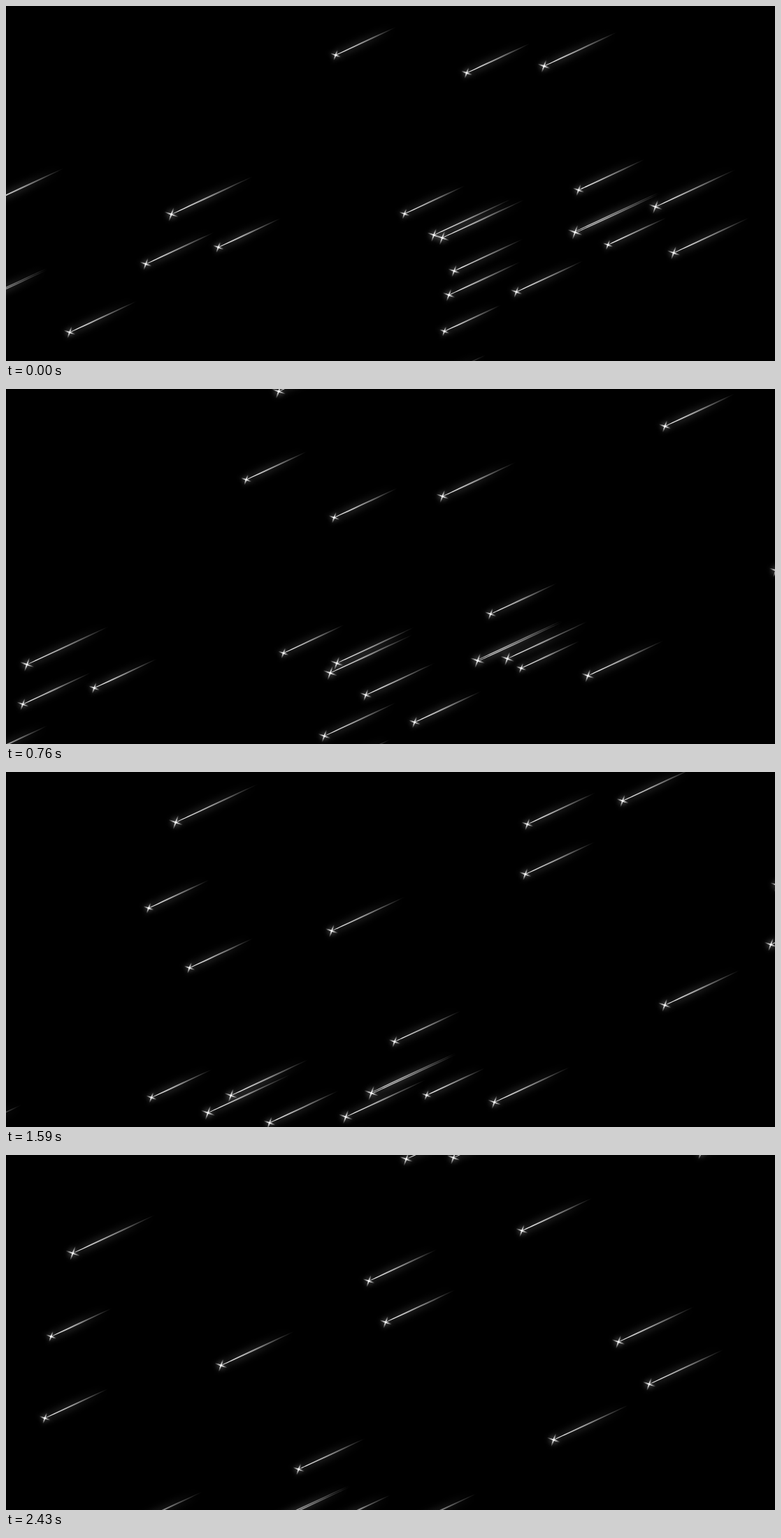
These frames come from a looping animation (1100x509 px, 2500 ms). An HTML page with a canvas:

```html
<!DOCTYPE html>
<html lang="en">
<head>
<meta charset="utf-8">
<title>Falling stars</title>
<style>
html, body { margin: 0; width: 100%; height: 100%; overflow: hidden; background: #000; }
canvas { display: block; }
</style>
</head>
<body>
<canvas id="sky" width="1100" height="509"></canvas>
<script>
const ctx = document.getElementById("sky").getContext("2d");
const W = 1100, H = 509, LOOP = 2500, STEPS = 36;
const TILT = 25 * Math.PI / 180;
const SLOPE = Math.tan(TILT);

// head x, head y at the start; leftward pixels per step; horizontal reach of the tail
const stars = [
  [471.5, 70.5, 11.63, 87], [659, 96, 17.24, 91], [769.5, 86.3, 13.2, 105],
  [819, 264, 11.44, 95], [929, 288, 19.26, 115], [814, 324.5, 12.67, 122],
  [-62, 433.5, 13, 122], [-22, 281.5, 13, 105], [236.5, 298.8, 18.77, 117],
  [200, 370, 16, 98], [303.7, 346, 16.14, 90], [91, 468, 11.64, 97],
  [570, 298, 15.74, 87], [612, 328.5, 12.62, 111], [624, 332.5, 14.57, 118],
  [641, 380, 11.48, 99], [633.5, 414.5, 16.2, 103], [627, 466.5, 14.35, 81],
  [730, 410, 13.23, 96], [861, 342.5, 11.28, 84], [955, 354, 11.15, 109],
  [592, 544.5, 13, 95], [1125.5, -31.8, 16.64, 100], [525, -59.4, 12.27, 118],
  [1247, 192.3, 13.25, 108], [1180.5, -127.7, 18.9, 98], [1158, -87.2, 12, 101],
  [1537.5, -40.4, 18.9, 109], [1427.5, 92, 14.5, 107],
  [1027.5, -206.2, 13, 110], [1095, -208.2, 13, 110], [1449, -215.2, 13, 105]
];

// Thin ellipse from x0 to x1, filled along its length
function lens(x0, x1, y, height, stops) {
  const fill = ctx.createLinearGradient(x0, 0, x1, 0);
  stops.forEach((a, i) => fill.addColorStop(i / (stops.length - 1), `rgba(255,255,255,${a})`));
  ctx.fillStyle = fill;
  ctx.beginPath();
  ctx.ellipse((x0 + x1) / 2, y, (x1 - x0) / 2, height / 2, 0, 0, Math.PI * 2);
  ctx.fill();
}

function drawStar(x, y, reach) {
  const len = reach / Math.cos(TILT);
  const arm = len / 12;
  ctx.save();
  ctx.translate(x, y);
  ctx.rotate(-TILT);
  if (reach > 120) {
    lens(0, len, -1, 1.5, [1, 0]);
    lens(0, len, 1, 1.5, [1, 0]);
  } else {
    lens(0, len, 0, 2, [1, 0]);
  }
  for (const turn of [Math.PI / 4, -Math.PI / 4]) {
    ctx.save();
    ctx.rotate(turn);
    lens(-arm, arm, 0, 2, [0, 1, 0]);
    ctx.restore();
  }
  ctx.restore();
}

// Steps last 70 ms, apart from two of 60 ms
const startOf = n => 70 * n - (n >= 4 ? 10 : 0) - (n >= 20 ? 10 : 0);

function stepAt(ms) {
  let n = STEPS - 1;
  while (n > 0 && startOf(n) > ms) n--;
  return n;
}

function draw(n) {
  ctx.shadowBlur = 0;
  ctx.fillStyle = "#000";
  ctx.fillRect(0, 0, W, H);
  ctx.shadowColor = "#fff";
  ctx.shadowBlur = 12;
  for (const [x, y, speed, reach] of stars) {
    const moved = speed * n;
    const hx = x - moved, hy = y + moved * SLOPE;
    if (hx + reach < -20 || hx > W + 30 || hy < -30 || hy - reach * SLOPE > H + 20) continue;
    drawStar(hx, hy, reach);
  }
}

const begin = performance.now();
let shown = 0;
draw(0);

function tick() {
  const n = stepAt((performance.now() - begin) % LOOP);
  if (n !== shown) draw(shown = n);
  requestAnimationFrame(tick);
}
requestAnimationFrame(tick);
</script>
</body>
</html>
```
